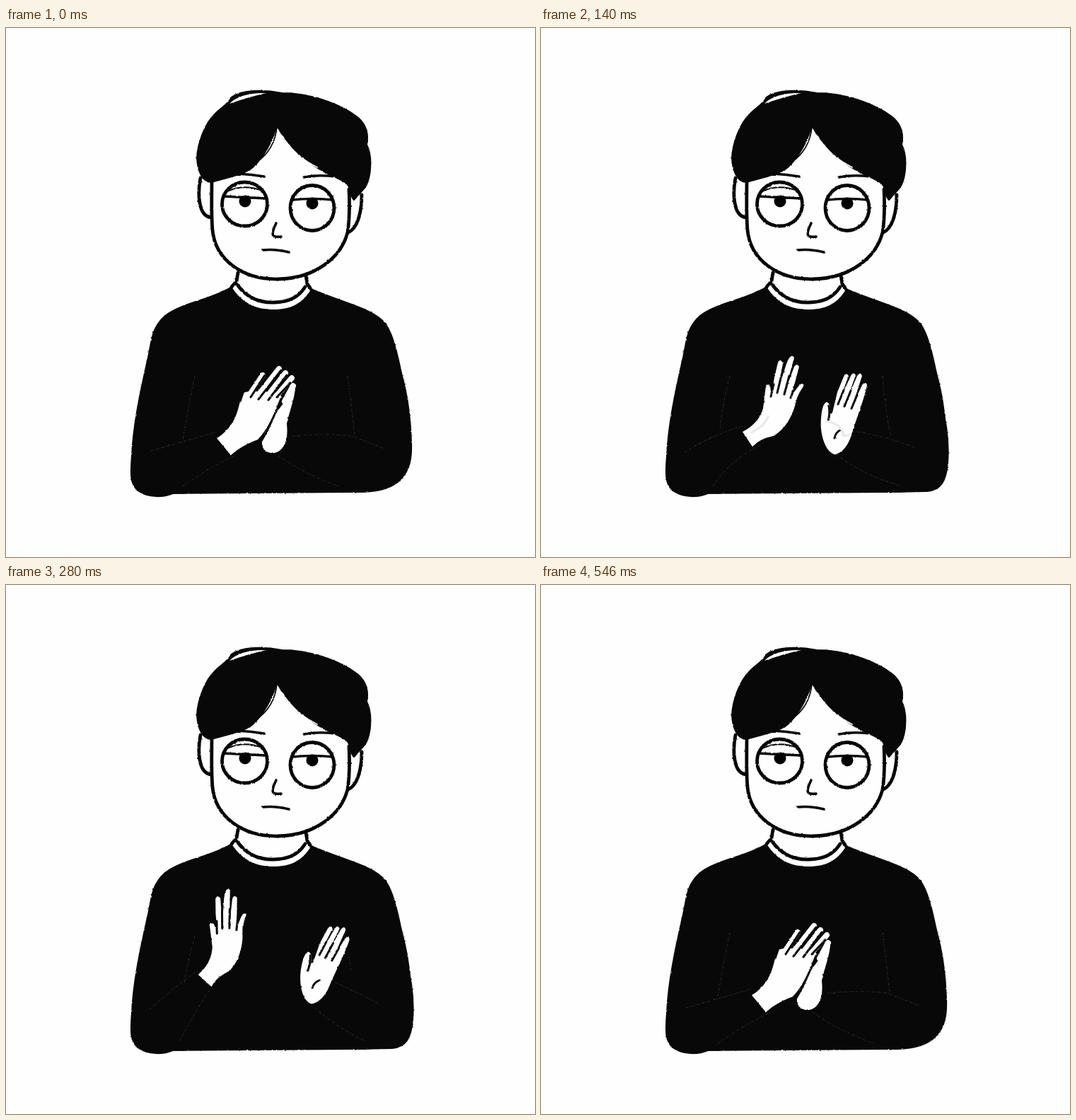
An HTML page without scripts that plays this animation: 748x748 px, repeating every 0.63 s.

```html
<!DOCTYPE html>
<html lang="en">
<head>
<meta charset="utf-8">
<title>Slow clap</title>
<style>
html, body { margin: 0; width: 100%; height: 100%; overflow: hidden; background: #fefefe; }
svg { display: block; width: 100vw; height: 100vh; }
.line { fill: none; stroke: #050505; stroke-width: 4.8; stroke-linecap: round; stroke-linejoin: round; }
.thin { stroke-width: 3.6; }
.hair { stroke-width: 1.8; }
.skin { fill: #fefefe; }
.cloth { fill: #080808; stroke: #080808; stroke-width: 2; stroke-linejoin: round; }
.finger { fill: none; stroke: #fefefe; stroke-width: 8; stroke-linecap: round; }
.gap { fill: none; stroke: #080808; stroke-width: 3; stroke-linecap: round; }
.fold { fill: none; stroke: #343434; stroke-width: 1; stroke-dasharray: 3 2 1 2; }
.ghost { fill: none; stroke: #e9e9e9; stroke-width: 3; }

.pose { visibility: hidden; animation: .63s step-end infinite; }
.closed { animation-name: closed; }
.parting { animation-name: parting; }
.open { animation-name: open; }
.wide { animation-name: wide; }
.trail { animation-name: trail; }
.apart { animation-name: apart; }
@keyframes closed { 0%, 66.66% { visibility: visible } 11.11% { visibility: hidden } 100% { visibility: visible } }
@keyframes parting { 0%, 22.22%, 100% { visibility: hidden } 11.11% { visibility: visible } }
@keyframes open { 0%, 44.44%, 66.66%, 100% { visibility: hidden } 22.22%, 55.55% { visibility: visible } }
@keyframes wide { 0%, 55.55%, 100% { visibility: hidden } 44.44% { visibility: visible } }
@keyframes trail { 0%, 33.33%, 100% { visibility: hidden } 22.22% { visibility: visible } }
@keyframes apart { 0%, 66.66%, 100% { visibility: hidden } 22.22% { visibility: visible } }
</style>
</head>
<body>
<svg viewBox="0 0 748 748">
<defs>
  <filter id="rough" filterUnits="userSpaceOnUse" x="0" y="0" width="748" height="748" color-interpolation-filters="sRGB">
    <feTurbulence type="fractalNoise" baseFrequency=".3" numOctaves="2" seed="4"/>
    <feDisplacementMap in="SourceGraphic" scale="2.2" xChannelSelector="R" yChannelSelector="G"/>
  </filter>

  <g id="left">
    <path class="skin" d="M285 571C302 562 310 551 314 538L316 522L318 506Q321 502 324 507L326 519L330 494L335 473Q339 467 342 474L335 512L347 475Q353 459 358 466L345 514L358 479Q362 473 365 479L354 520L363 508Q369 500 372 505C366 514 362 521 360 530C357 545 346 568 328 577C315 580 308 583 299 592Z"/>
    <path class="gap" d="M325 521L329 504M334 516L340 491M344 518L351 492M353 523L360 504"/>
  </g>

  <g id="right">
    <path class="skin" d="M415 603C402 599 394 575 396 552C397 540 399 530 404 529Q410 530 409 545L412 544L419 515L428 493Q432 486 435 492L421 529L438 492Q442 485 445 491L430 532L447 492Q452 485 454 492L440 535L454 505Q459 498 461 505C457 525 445 555 439 575C435 590 425 602 415 603Z"/>
    <path class="gap" d="M407 534Q409 545 406 556M420 532L428 512M429 535L438 513M439 538L447 519"/>
    <path class="gap" d="M415 580Q416 572 424 568"/>
  </g>
</defs>

<g filter="url(#rough)">
  <!-- torso -->
  <path class="cloth" d="M319 366C294 383 247 389 225 407C204 425 206 447 200 470C190 515 180 560 178 605C176 630 175 646 188 655C201 664 222 664 236 658L490 656C522 657 545 652 558 638C571 625 574 608 573 585C572 555 568 520 560 492C554 466 549 437 537 419C520 397 485 392 431 369Z"/>
  <path class="pose parting cloth" d="M195 500C182 540 174 580 172 615C170 640 178 655 200 661Z"/>
  <path class="pose apart cloth" d="M566 530C574 560 577 590 575 615C573 640 566 653 546 655L500 656Z"/>
  <path class="skin" d="M328 345L326 359L319 366C334 390 355 398 378 398C405 398 420 388 431 370L424 350Z"/>
  <path class="line" d="M328 346L326 358L319 366M424 350L426 362L431 369"/>
  <path class="line" d="M327 363C341 382 359 389 380 388C402 387 414 380 423 366"/>

  <!-- head -->
  <path class="line" d="M275 212C271 232 271 266 290 268M503 236C503 263 496 284 484 289"/>
  <path class="line skin" style="fill:#fefefe" d="M291 212C291 240 290 265 292 286C296 326 332 356 385 355C438 354 474 324 483 289C486 270 486 250 485 228"/>
  <path class="cloth" d="M290 218C278 218 271 203 270 184C271 163 281 135 296 121C305 112 314 108 319 98C333 87 365 87 390 92C430 92 473 107 497 126C510 137 513 150 510 165C518 180 517 210 508 225L492 243C486 238 488 226 482 220C473 213 457 208 446 201C420 187 397 164 383 138C377 158 367 180 349 197C337 207 315 211 290 218Z"/>
  <path class="skin" d="M316 107C326 96 346 91 368 92C350 96 333 101 316 107Z"/>
  <path class="line hair" d="M383 138C382 162 369 180 355 189"/>
  <path class="line hair" style="stroke:#fefefe" d="M391 153C402 173 420 187 440 197"/>
  <path class="line thin" d="M328 206Q347 207 365 210M421 211Q440 207 466 210"/>

  <!-- face -->
  <ellipse class="line" cx="337.500" cy="249" rx="32" ry="31"/>
  <ellipse class="line" cx="433" cy="254.500" rx="31" ry="32"/>
  <path class="line thin" d="M308 238L368 241M405 243Q434 240 462 243"/>
  <path class="line hair" d="M313 231Q337 220 362 230"/>
  <circle cx="338" cy="245" r="8.500"/>
  <circle cx="433" cy="248" r="8.500"/>
  <path class="line thin" d="M382 276C378 284 376 291 378 294Q382 296 389 295M363 314Q381 312 400 317"/>

  <!-- palms together -->
  <g class="pose closed">
    <path class="fold" d="M267 492Q257 540 250 582M205 598L250 585L298 571M250 648Q285 623 325 604M483 492L493 575M397 578Q450 572 490 577L535 595M385 605Q425 632 470 648"/>
    <path class="skin" d="M383 543L400 520L409 504C410 520 401 540 397 560C400 585 391 602 375 601C362 599 358 588 366 572Z"/>
    <path class="finger" d="M394 528L406 506"/>
    <path class="skin" d="M298 580C315 570 325 553 329 536L334 516L347 513L385 516L390 522C379 545 370 568 356 582C342 587 329 594 318 604Z"/>
    <path class="finger" d="M341 524L363 491M353 524L386 482M367 524L395 488M381 522L404 495"/>
    <path class="gap" d="M346 522L366 491M357 525L389 484M371 526L397 491M383 522L402 502"/>
    <path class="gap" d="M389 524C380 547 371 569 359 587M331 528L336 513"/>
  </g>

  <!-- hands just parted -->
  <g class="pose parting">
    <path class="fold" d="M267 492Q254 540 250 575M208 597Q250 577 298 568M235 655Q270 612 310 590M483 492L493 575M415 577Q460 571 490 576L535 594M398 606Q435 635 470 648"/>
    <use href="#left" transform="translate(302 582) rotate(5.300) scale(.97) translate(-292 -581)"/>
    <use href="#right" transform="translate(-22 3)"/>
  </g>

  <!-- hands open -->
  <g class="pose open">
    <path class="fold" d="M267 492Q256 535 253 568M203 600Q240 576 285 563M243 648Q266 612 310 590M483 492Q487 545 495 578M440 570Q490 577 530 594M418 603Q450 630 510 648"/>
    <use href="#left"/>
    <use href="#right"/>
  </g>
  <path class="pose trail ghost" d="M297 572Q315 565 322 548M402 556Q425 558 428 577L437 575"/>

  <!-- hands wide -->
  <g class="pose wide">
    <path class="fold" d="M267 497Q256 535 252 565M203 600Q240 567 270 546M245 645Q266 605 290 570M485 525L488 545M465 562Q500 577 530 594M431 592Q465 625 510 646"/>
    <use href="#left" transform="translate(281 559) rotate(-14.200) translate(-292 -581)"/>
    <use href="#right" transform="translate(431 591) rotate(6) scale(.98) translate(-415 -602)"/>
  </g>
</g>
</svg>
</body>
</html>
```
